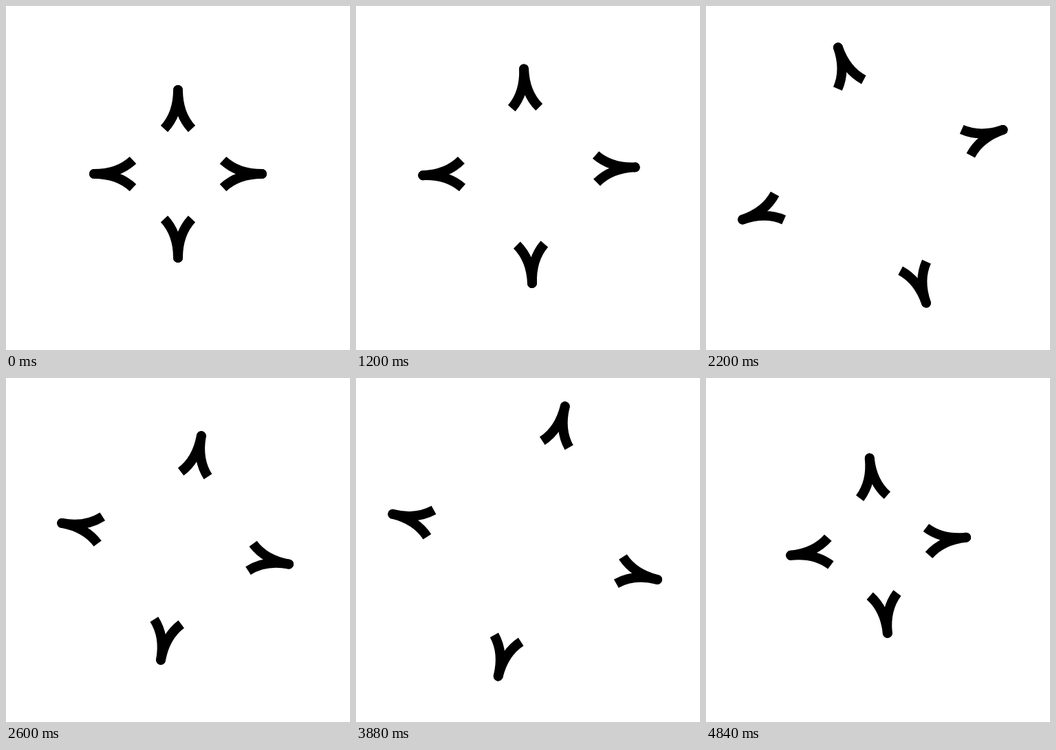
Recreate the animation shown at these times as an HTML page with a canvas. Size 500 px wide and 500 px high, loop 4.88 s.

```html
<!DOCTYPE html>
<html>
<head>
<meta charset="utf-8">
<style>
  html, body { margin: 0; width: 100%; height: 100%; overflow: hidden; background: #fff; }
  canvas { display: block; width: 500px; height: 500px; }
</style>
</head>
<body>
<canvas id="stage" width="500" height="500"></canvas>
<script>
const ctx = document.getElementById('stage').getContext('2d');
const STEP = 40, LOOP = 4880;
const SPIN = 2 * Math.PI / 123;
const NEAR = 122;
const REACH = [83, 91, 75, 75];                // up, right, down, left
const TURNS = [0, 17, 39, 56, 76, 96, 123];    // steps where the arrows reverse

// 0 when the arrows are closest to the centre, 1 when farthest
function pulse(n) {
  const i = TURNS.findIndex(turn => turn > n);
  const u = (n - TURNS[i - 1]) / (TURNS[i] - TURNS[i - 1]);
  return i % 2 ? u : 1 - u;
}

// Forked arrow with its tip at the origin, pointing up
function arrow() {
  ctx.beginPath();
  ctx.moveTo(-20, 56.5);
  ctx.quadraticCurveTo(0, 35, 0, 0);
  ctx.quadraticCurveTo(0, 35, 20, 56.5);
  ctx.stroke();
  ctx.beginPath();
  ctx.arc(0, 0, 7, 0, 2 * Math.PI);
  ctx.fill();
}

function draw(time) {
  const n = Math.floor((time % LOOP) / STEP);
  const spread = pulse(n);
  const swayX = -5 * Math.sin(Math.PI * n / 115);
  const swayY = 4.2 * Math.exp(-(((n - 85) / 28) ** 2));
  const sideways = [swayX, swayY, -swayX, -swayY];

  ctx.setTransform(1, 0, 0, 1, 0, 0);
  ctx.fillStyle = '#fff';
  ctx.fillRect(0, 0, 500, 500);
  ctx.fillStyle = ctx.strokeStyle = '#000';
  ctx.lineWidth = 14;
  ctx.lineJoin = 'round';
  ctx.translate(250, 244);
  ctx.rotate(n * SPIN);
  REACH.forEach((reach, i) => {
    ctx.save();
    ctx.rotate(i * Math.PI / 2);
    ctx.translate(sideways[i], -NEAR - reach * spread);
    arrow();
    ctx.restore();
  });
}

let start;
function tick(now) {
  start ??= now;
  draw(Math.max(0, now - start));
  requestAnimationFrame(tick);
}
draw(0);
requestAnimationFrame(tick);
</script>
</body>
</html>
```
